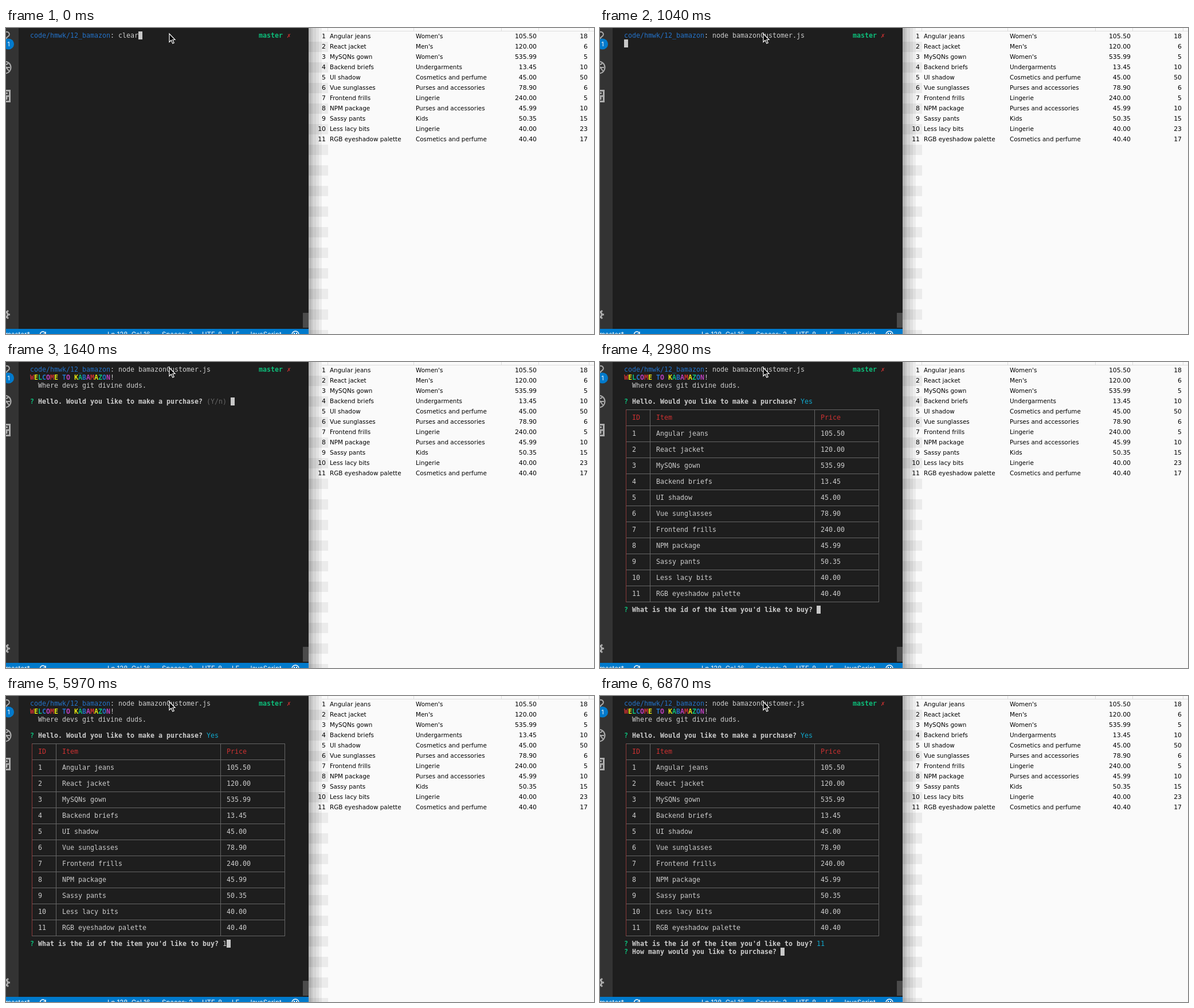
An HTML page with a canvas that plays this animation: 1026x535 px, repeating every 8000 ms.

```html
<!DOCTYPE html>
<html lang="en">
<head>
<meta charset="utf-8">
<title>Terminal shop</title>
<style>
  html, body { margin: 0; width: 100%; height: 100%; overflow: hidden; background: #1e1e1e; }
  canvas { display: block; }
</style>
</head>
<body>
<canvas id="stage" width="1026" height="535"></canvas>
<script>
const ctx = document.getElementById('stage').getContext('2d');
const LOOP = 8000;
const CELL = 7, LINE = 14, LEFT = 42, TOP = 6;
const C = {
  text: '#cccccc', blue: '#2472c8', green: '#0dbc79', red: '#cd3131',
  yellow: '#e5e510', magenta: '#bc3fbc', cyan: '#11a8cd', dim: '#666666'
};
const RAINBOW = [C.red, C.yellow, C.green, C.blue, C.magenta];
const MONO = '11.63px "DejaVu Sans Mono", monospace';
const SANS = '"DejaVu Sans", sans-serif';

const products = [
  ['Angular jeans', "Women's", '105.50', 18],
  ['React jacket', "Men's", '120.00', 6],
  ['MySQNs gown', "Women's", '535.99', 5],
  ['Backend briefs', 'Undergarments', '13.45', 10],
  ['UI shadow', 'Cosmetics and perfume', '45.00', 50],
  ['Vue sunglasses', 'Purses and accessories', '78.90', 6],
  ['Frontend frills', 'Lingerie', '240.00', 5],
  ['NPM package', 'Purses and accessories', '45.99', 10],
  ['Sassy pants', 'Kids', '50.35', 15],
  ['Less lacy bits', 'Lingerie', '40.00', 23],
  ['RGB eyeshadow palette', 'Cosmetics and perfume', '40.40', 17]
];

function rect(x, y, w, h, color) {
  ctx.fillStyle = color;
  ctx.fillRect(x, y, w, h);
}

function text(str, x, y, font, color, align = 'left') {
  ctx.font = font;
  ctx.fillStyle = color;
  ctx.textAlign = align;
  ctx.fillText(str, x, y);
}

function stroke(path, color, width) {
  ctx.strokeStyle = color;
  ctx.lineWidth = width;
  ctx.stroke(new Path2D(path));
}

function print(row, col, str, color = C.text, bold = false) {
  text(str, LEFT + col * CELL, TOP + row * LINE + 11, (bold ? 'bold ' : '') + MONO, color);
}

function caret(row, col) {
  rect(LEFT + col * CELL, TOP + row * LINE, CELL, LINE, '#c8c8c8');
}

function ask(row, question) {
  print(row, 0, '?', C.green, true);
  print(row, 2, question, C.text, true);
}

function drawSidebar() {
  rect(0, 0, 22, 526, '#333333');
  const icon = '#adadad';
  stroke('M0 7 A4 4 0 1 1 3 15 M3 15 L-2 21', icon, 2);
  ctx.fillStyle = '#007acc';
  ctx.beginPath();
  ctx.arc(4.5, 28, 9.5, 0, 7);
  ctx.fill();
  text('1', 4.5, 32, '11px Inter, sans-serif', '#ffffff', 'center');
  stroke('M-2 58.5 A10.5 10.5 0 0 1 -2 79.5 M-4 63 L5 75 M0 69 H7 M0 64 L4 62', icon, 2);
  stroke('M0 109.5 H6.5 V128.5 H0 M6 119 H1 V124 H-2 M0 114 H3', icon, 3);
  stroke('M-2 496 A5 5 0 0 1 -2 506 M2 501 H7 M1 497 L4 494 M1 505 L4 508', icon, 3);
}

function drawStatusBar() {
  rect(0, 526, 528, 9, '#007acc');
  const labels = [['master*', -1], ['Ln 128, Col 16', 177], ['Spaces: 2', 272],
    ['UTF-8', 342], ['LF', 394], ['JavaScript', 423]];
  for (const [label, x] of labels) text(label, x, 539.5, '11.5px Inter, sans-serif', '#ffffff');
  stroke('M60 537 A4.5 4.5 0 0 1 68 533 M69 531 V535 H65', '#ffffff', 1.5);
  stroke('M499 536 A6 6 0 1 1 511 536', '#ffffff', 1.5);
  rect(502, 533, 2, 2, '#ffffff');
  rect(506, 533, 2, 2, '#ffffff');
}

function drawSheet() {
  rect(528, 0, 498, 535, '#fafafa');
  for (let y = 24; y < 535; y += 36) rect(528, y, 34, 18, '#ebebeb');
  const shadow = [[528, 4, .27], [532, 3, .21], [535, 6, .15], [541, 5, .1], [546, 5, .05]];
  for (const [x, w, alpha] of shadow) rect(x, 0, w, 535, `rgba(0,0,0,${alpha})`);
  rect(551, 5, 475, 1, '#dddddd');
  for (const x of [561, 711, 864, 929, 1017]) rect(x, 0, 1, 5, '#dddddd');

  const words = '10.4px ' + SANS, digits = '10.9px ' + SANS;
  products.forEach(([item, department, price, stock], i) => {
    const y = 18 + i * 18;
    text(i + 1, 558, y, digits, '#000000', 'right');
    text(item, 565, y, words, '#000000');
    text(department, 715, y, words, '#000000');
    text(price, 926, y, digits, '#000000', 'right');
    text(stock, 1015, y, digits, '#000000', 'right');
  });
}

function drawTable() {
  for (let i = 0; i <= 12; i++) rect(45, 83 + i * 28, 442, 1, C.dim);
  for (const x of [45, 87, 374, 486]) rect(x, 83, 1, 337, x === 45 ? '#8a3a3a' : C.dim);
  const cells = [['ID', 'Item', 'Price'], ...products.map((p, i) => [i + 1, p[0], p[2]])];
  cells.forEach(([id, item, price], i) => {
    const row = 6 + i * 2, color = i ? C.text : C.red;
    print(row, 2, id, color);
    print(row, 8, item, color);
    print(row, 49, price, color);
  });
}

function drawTerminal(t) {
  rect(518, 498, 10, 26, '#4b4b4b');
  print(0, 0, 'code/hmwk/12_bamazon', C.blue);
  print(0, 20, ':');
  print(0, 57, 'master', C.green, true);
  print(0, 64, '✗', C.red, true);

  const command = t < 290 ? 'clear' : 'node bamazonCustomer.js';
  print(0, 22, command);
  if (t < 1040) return caret(0, 22 + command.length);
  if (t < 1640) return caret(1, 0);

  [...'WELCOME TO KABAMAZON'].forEach((ch, i) => print(1, i, ch, RAINBOW[i % 5], true));
  print(1, 20, '!');
  print(2, 2, 'Where devs git divine duds.');
  ask(4, 'Hello. Would you like to make a purchase?');
  if (t < 2980) {
    const answer = t < 2680 ? '' : 'y';
    print(4, 44, '(Y/n)', C.dim);
    print(4, 50, answer);
    return caret(4, 50 + answer.length);
  }

  print(4, 44, 'Yes', C.cyan);
  drawTable();
  ask(30, "What is the id of the item you'd like to buy?");
  const id = t < 5970 ? '' : t < 6420 ? '1' : '11';
  print(30, 48, id, t < 6870 ? C.text : C.cyan);
  if (t < 6870) return caret(30, 48 + id.length);
  ask(31, 'How many would you like to purchase?');
  caret(31, 39);
}

function drawPointer() {
  const arrow = new Path2D('M285 10 V24.5 L288.3 21.3 L290.8 27 L293.2 26 L290.8 20.5 H295 Z');
  ctx.fillStyle = '#000000';
  ctx.fill(arrow);
  ctx.strokeStyle = '#ffffff';
  ctx.lineWidth = 1.2;
  ctx.stroke(arrow);
}

function frame() {
  rect(0, 0, 1026, 535, '#1e1e1e');
  drawSidebar();
  drawTerminal(performance.now() % LOOP);
  drawStatusBar();
  drawSheet();
  drawPointer();
  requestAnimationFrame(frame);
}
frame();
</script>
</body>
</html>
```
